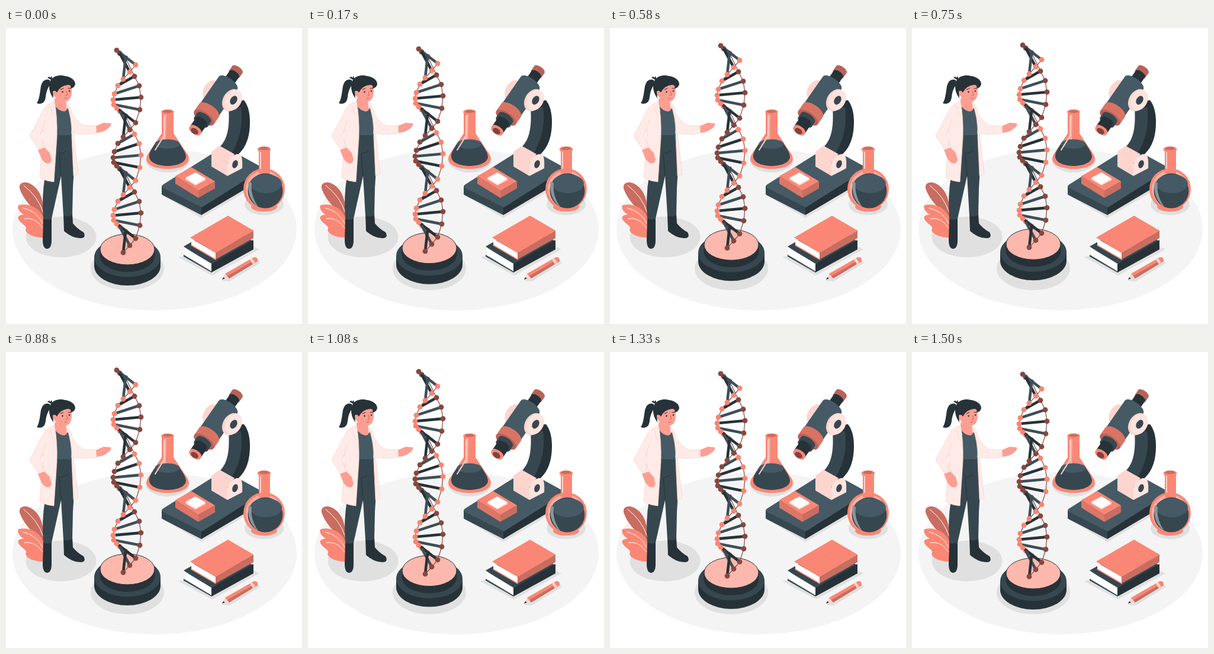
Animation, 500 px wide and 500 px high, one loop 1540 ms. Source, as an HTML page:

```html
<!DOCTYPE html>
<html lang="en">
<head>
<meta charset="utf-8">
<title>Genetics lab</title>
<style>
html, body { margin: 0; width: 100%; height: 100%; overflow: hidden; background: #fff; }
svg { display: block; width: 100%; height: 100%; }
.coral { fill: #fa8775; }
.rust { fill: #c96d60; }
.pink { fill: #fdd5ce; }
.skin { fill: #fd9e93; }
.coat { fill: #feebe7; stroke: #f9cfc7; stroke-width: .7; }
.slate { fill: #455a64; }
.dark { fill: #37474f; }
.ink { fill: #263238; }
.shade { fill: #e0e0e0; }
.white { fill: #fff; }
.line { fill: none; stroke-linecap: round; }
</style>
</head>
<body>
<svg viewBox="0 0 500 500">
  <ellipse cx="251" cy="340" rx="240" ry="137" fill="#f4f4f4"/>
  <g class="shade">
    <ellipse cx="93" cy="353" rx="59.500" ry="34.500"/>
    <ellipse cx="205" cy="406" rx="62" ry="37"/>
    <ellipse cx="273" cy="223" rx="37" ry="21"/>
    <ellipse cx="436" cy="298" rx="33" ry="18"/>
    <path d="M260 280L330 321L440 256L420 240Z"/>
    <path d="M291 387L348 418L428 374L405 362Z"/>
    <path d="M364 427L378 428L429 397L424 391Z"/>
  </g>

  <g id="leaves">
    <path class="rust" d="M64 322C46 306 29 290 23 271C21 259 36 257 48 268C60 278 65 298 64 322Z"/>
    <path class="coral" d="M64 354C48 354 35 349 33 341C37 335 29 333 23 326C17 318 23 316 30 315C21 311 18 300 22 299C39 296 57 303 64 322Z"/>
    <path class="line" stroke="#fff" d="M30 266Q54 284 63 312M29 304Q52 309 62 330M31 322Q50 319 62 338"/>
  </g>

  <g id="woman">
    <path class="ink" d="M63 322L77 320L77 358Q77 373 69 373Q62 372 62 358ZM97 316L112 313L113 330Q120 339 131 345Q136 354 127 355Q113 356 98 343Z"/>
    <path class="dark" d="M84 178H112Q117 225 113 270L112 316Q104 320 97 317L93 250L77 322Q70 325 63 322Q60 285 66 250Z"/>
    <path class="line" stroke="#263238" d="M93 250L90 212Q97 212 103 207"/>
    <path class="slate" d="M83 132Q98 146 106 133Q112 140 112 160L110 181H84Z"/>
    <path class="skin" d="M82 119L101 122L102 131Q105 140 98 141Q88 140 82 130Z"/>
    <path class="skin" d="M151 166L165 160L177 161Q179 165 172 170Q164 177 152 177Z"/>
    <path class="coat" d="M101 125Q109 130 112 145Q120 160 133 165L152 165L153 178Q130 181 114 178L122 247L114 250L111 185Q112 150 101 125Z"/>
    <path class="coat" d="M82 124Q69 128 64 137Q52 160 40 182L56 207L66 203L58 181L63 172L57 253Q68 259 81 260L86 185Q87 150 82 124Z"/>
    <path class="line" stroke="#f9cfc7" stroke-width=".8" d="M58 181L67 155M75 132L79 146L82 149"/>
    <path class="skin" d="M54 206L65 202L74 211L77 223L74 228Q67 231 60 221Z"/>
    <path class="ink" d="M74 88Q63 84 59 98C57 112 56 121 52 127Q65 131 67 117C68 105 72 100 75 94ZM70 84L73 82L75 84L77 81L79 89Z"/>
    <path class="skin" d="M80 100Q93 86 110 94Q113 112 108 120Q103 126 94 125Q84 122 82 115Q74 112 77 105Z"/>
    <path class="ink" d="M73 96C74 82 89 78 99 81C108 82 117 87 117 95Q115 102 109 102Q111 96 105 96Q92 97 86 109Q83 104 79 107L80 119Q72 108 73 96Z"/>
    <g class="ink"><circle cx="95.500" cy="108" r="1.300"/><circle cx="107" cy="106.500" r="1.300"/></g>
    <path class="line" stroke="#263238" d="M92 104L97 102M105 102L109 102"/>
    <path class="line" stroke="#c65a50" stroke-width=".9" d="M102 107L104 113L101 114M99 119L103 118"/>
  </g>

  <g id="flask">
    <path class="coral" d="M263 141V178L239 214C232 228 246 238 273 238C300 238 314 228 307 214L283 178V141Z"/>
    <path fill="#fbb0a4" d="M267 146V180L244 215C239 225 252 233 273 233S307 225 302 215L279 180V146Z"/>
    <path class="coral" d="M271 146H281V178L288 190H270Z"/>
    <path class="dark" d="M252 195C246 204 241 211 242 218C244 238 302 238 304 218C304 211 299 204 293 195Z"/>
    <ellipse class="slate" cx="272.500" cy="196" rx="21" ry="8"/>
    <path class="line" stroke="#fbd0c8" stroke-width="2" d="M267 149V182L252 206"/>
    <ellipse class="coral" cx="273" cy="142" rx="11" ry="4.500"/>
    <ellipse class="rust" cx="273" cy="141" rx="8" ry="2.500"/>
  </g>

  <g id="microscope">
    <path class="dark" d="M263 267V280Q263 282 266 283L330 316V302Z"/>
    <path class="ink" d="M330 302L433 236V255L330 316Z"/>
    <path class="slate" d="M266 264L352 210L390 212L430 234Q434 237 429 241L331 303L265 270Q261 267 266 264Z"/>
    <path class="coral" d="M286 250L313 235L353 259L325 275Z"/>
    <path fill="#dd7667" d="M286 250L325 275V287L286 263Z"/>
    <path class="rust" d="M325 275L353 259V271L325 287Z"/>
    <path class="pink" d="M303 254L320 245L337 255V257L320 266L303 256Z"/>
    <path class="white" d="M303 253L320 244L337 254L320 264Z"/>
    <path class="ink" d="M384 124L402 122C413 136 413 158 411 175C408 197 398 211 384 220L370 205Z"/>
    <path class="dark" d="M376 134L397 134C400 158 398 184 380 214L361 201C375 187 378 166 376 134Z"/>
    <path class="pink" d="M347 209L361 199L386 213L374 228V250L347 234Z"/>
    <path fill="#fee3de" d="M374 250V230C376 218 389 210 396 214Q400 218 399 237Z"/>
    <ellipse class="dark" cx="387" cy="230" rx="4.500" ry="7" transform="rotate(20 387 230)"/>
    <ellipse class="pink" cx="346" cy="105" rx="12" ry="18" transform="rotate(30 346 105)"/>
    <g id="tube" transform="translate(391 70) rotate(34.800)"></g>
    <ellipse class="pink" cx="381" cy="122" rx="14.500" ry="20" transform="rotate(30 381 122)"/>
    <ellipse fill="#fee3de" cx="384" cy="122" rx="13.500" ry="18.500" transform="rotate(30 384 122)"/>
    <ellipse class="dark" cx="384.500" cy="122" rx="5.500" ry="8" transform="rotate(30 384.500 122)"/>
  </g>

  <g id="round-flask">
    <ellipse class="coral" cx="436" cy="302" rx="22" ry="8"/>
    <path class="coral" d="M427 204H446V240H427Z"/>
    <circle class="coral" cx="436" cy="272" r="35"/>
    <circle fill="#fbb0a4" cx="436" cy="272" r="31"/>
    <path class="coral" d="M427 204H446V246H427Z"/>
    <circle class="dark" cx="438" cy="275" r="29.500"/>
    <ellipse class="slate" cx="439" cy="263" rx="27" ry="16"/>
    <path fill="#8b969b" d="M410 259C407 278 414 294 426 302C418 290 413 277 415 262Z"/>
    <path class="line" stroke="#fbd0c8" stroke-width="2" d="M430 210V237"/>
    <ellipse class="coral" cx="436" cy="205" rx="11.500" ry="5"/>
    <ellipse class="rust" cx="436" cy="203.500" rx="8.500" ry="2.800"/>
  </g>

  <g id="books">
    <path class="dark" d="M300 369L364 333L418 360L347 398Z"/>
    <path class="dark" d="M300 369L347 397V413L300 386V383L343 407V400Z"/>
    <path class="white" d="M302 371L347 398V411L302 384Z"/>
    <path class="ink" d="M347 398L418 358V374L347 413Z"/>
    <path class="white" d="M313 356L355 380V391L313 367Z"/>
    <path class="rust" d="M354 379L418 342V355L354 391Z"/>
    <path class="coral" d="M311 354L375 317L418 342L354 380Z"/>
    <path class="line" stroke="#fa8775" stroke-width="1.500" d="M313 367L354 391"/>
  </g>

  <g id="pencil">
    <path class="pink" d="M365 425L370 415L377 422Z"/>
    <path class="ink" d="M365 425L367 421L370 423Z"/>
    <path class="coral" d="M370 415L419 387L425 394L377 423Z"/>
    <path class="rust" d="M374 419L422 391L425 394L377 423Z"/>
    <path class="pink" d="M412 391L416 389L421 396L417 399Z"/>
    <path class="coral" d="M416 389L421 387Q426 388 425 394L421 396Z"/>
  </g>

  <g id="dna">
    <path class="ink" d="M149 387V402A56 33 0 0 0 261 402V387Z"/>
    <ellipse class="dark" cx="205" cy="387.500" rx="56" ry="33"/>
    <path class="ink" d="M158.500 374V385A46.500 27 0 0 0 251.500 385V374Z"/>
    <ellipse cx="205" cy="374" rx="46" ry="26" fill="#fdb8ad" stroke="#263238"/>
  </g>
</svg>
<script>
const dna = document.getElementById('dna');
const tube = document.getElementById('tube');

function add(parent, tag, attrs) {
  const el = document.createElementNS('http://www.w3.org/2000/svg', tag);
  for (const name in attrs) el.setAttribute(name, attrs[name]);
  parent.append(el);
}

function cylinder(top, bottom, r, fill, face = fill) {
  const ry = r * 0.45;
  add(tube, 'path', { fill, d: `M${-r} ${top}V${bottom}H${r}V${top}A${r} ${ry} 0 0 0 ${-r} ${top}` });
  add(tube, 'ellipse', { cx: 0, cy: bottom, rx: r, ry, fill: face });
}
cylinder(0, 10, 10.5, '#b86257');
cylinder(9, 28, 9.5, '#263238');
cylinder(28, 86, 19, '#455a64');
cylinder(84, 99, 20, '#d97465', '#b86257');
cylinder(99, 108, 14, '#37474f');
cylinder(106, 124, 11, '#263238');
cylinder(123, 127, 11, '#fa8775');
add(tube, 'ellipse', { cx: 0, cy: 127, rx: 7, ry: 4.5, fill: '#7f443d' });

// One full turn of a strand; the other strand is half a turn away.
const turn = [
  [228, 117], [226, 138], [219, 160], [209, 172], [198, 184], [189, 195], [183, 209],
  [181, 219], [182, 227], [187, 233], [192, 238], [202, 246], [217, 277], [225, 293]
];
const HALF = 97.7;
const FIRST = -5, LAST = 18;

function strandPoint(k) {
  const loop = Math.floor(k / 14);
  const [x, y] = turn[k - loop * 14];
  return [x, y + loop * 2 * HALF];
}
const strands = [{ color: '#87483f', shift: 0 }, { color: '#f98572', shift: 7 }];
for (const s of strands) {
  s.nodes = [];
  for (let k = FIRST; k <= LAST; k++) {
    const [x, y] = strandPoint(k + s.shift);
    s.nodes.push({ x, y: y - (s.shift ? HALF : 0), back: ((k + s.shift + 28) % 14) >> 1 === 5 });
  }
  add(dna, 'polyline', {
    points: s.nodes.map(n => n.x + ',' + n.y).join(' '),
    fill: 'none', stroke: '#87483f', 'stroke-width': 1.2
  });
}

function drawNodes(back) {
  for (const s of strands)
    for (const n of s.nodes)
      if (n.back === back) add(dna, 'circle', { cx: n.x, cy: n.y, r: 4.4, fill: s.color });
}
drawNodes(true);
strands[0].nodes.forEach((a, i) => {
  const b = strands[1].nodes[i];
  add(dna, 'line', {
    x1: a.x, y1: a.y, x2: b.x, y2: b.y,
    stroke: i % 2 ? '#263238' : '#3d4f58', 'stroke-width': 4.6
  });
});
drawNodes(false);

// Linear float: 10 px up and back every 1.5 s, restarted by the loop.
const LOOP = 1540, PEAK = 705, RISE = 750;
function frame(now) {
  const t = now % LOOP;
  const lift = 10 * Math.abs(1 - Math.abs(t - PEAK) / RISE);
  dna.setAttribute('transform', `translate(0 ${0.6 - lift})`);
  requestAnimationFrame(frame);
}
frame(performance.now());
</script>
</body>
</html>
```
